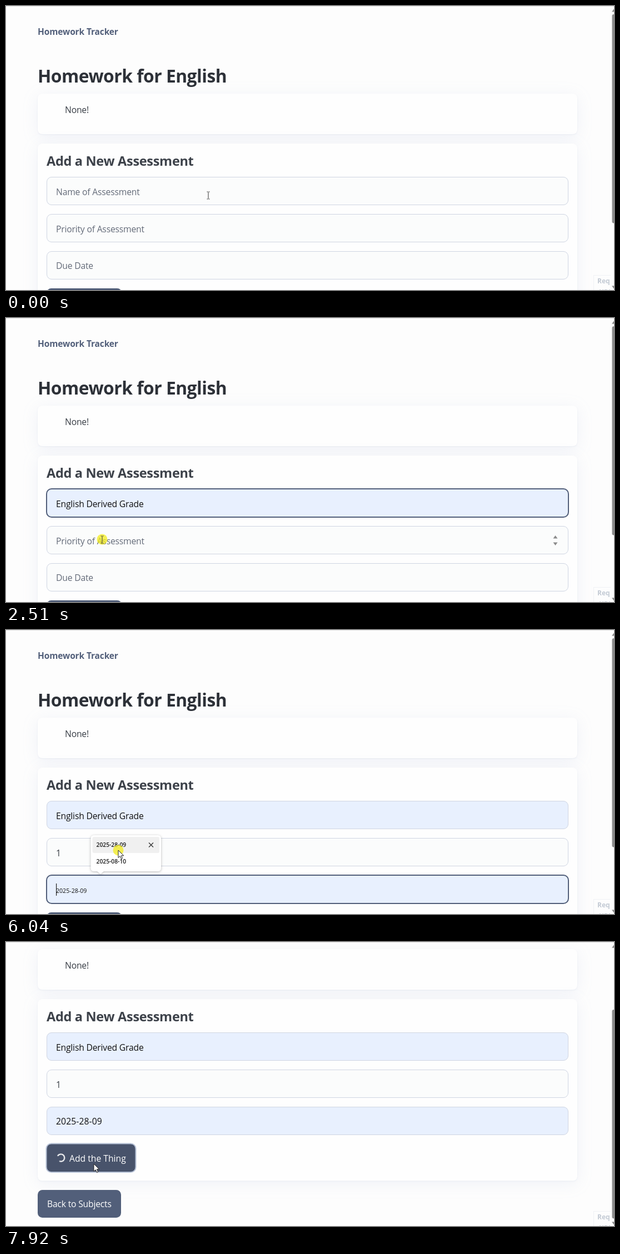
Write an HTML page that moves like this. It is 1094 px wide and 512 px high and loops after 7990 ms.

```html
<!DOCTYPE html>
<html lang="en">
<head>
<meta charset="utf-8">
<title>Homework Tracker</title>
<style>
html, body { margin: 0; width: 100%; height: 100%; overflow: hidden; background: #fdfdfd; }
svg { display: block; width: 1094px; height: 512px; }
text { font: 15.7px "Open Sans", "Noto Sans", sans-serif; letter-spacing: -.2px; fill: #373c44; }
.bold { font-weight: 700; }
.h1 { font-size: 31.8px; letter-spacing: -.5px; fill: #2d3138; }
.h2 { font-size: 23.5px; letter-spacing: -.3px; fill: #3d424a; }
.brand { font-size: 15.5px; letter-spacing: -.13px; fill: #525f7a; }
.hint { fill: #646b79; }
.value { fill: #111; }
.date { letter-spacing: .1px; }
.label { fill: #fff; letter-spacing: 0; }
.tight { letter-spacing: -.2px; }
.arial { font: 10.85px "Liberation Sans", Arial, sans-serif; letter-spacing: 0; }
.small { font-size: 10.6px; letter-spacing: 0; }
.option { font-size: 10.3px; font-weight: 600; fill: #1b1b1b; }
.day { letter-spacing: 0; }
.badge { font-size: 12px; letter-spacing: 0; fill: #c3cad4; }
.card { fill: #fefefe; filter: drop-shadow(0 1px 1px rgba(129,145,181,.1)) drop-shadow(0 5px 14px rgba(129,145,200,.11)); }
.field { fill: #fbfcfc; stroke: #cfd5e2; }
.ring { fill: none; stroke: #525f7a; stroke-width: 2; opacity: 0; }
.button { fill: #525f7a; }
.popup { fill: #fff; filter: drop-shadow(0 1px 2px rgba(0,0,0,.28)); }
.picked { fill: #f0f0f0; }
.close { fill: none; stroke: #333; stroke-width: 1.3; }
.bar { fill: #8b8b8b; }

/* One shared 7990 ms clock: percentage = ms / 79.9 */
.cut { animation: 7990ms step-end infinite; }
.run { animation: 7990ms linear infinite; }

#page { animation-name: scroll; }
@keyframes scroll {
  0% { transform: none; }
  83.35% { transform: translateY(-45px); }
  83.97% { transform: translateY(-101px); }
  84.85%, 100% { transform: translateY(-145px); }
}
#thumb { animation-name: thumb; }
@keyframes thumb {
  0% { transform: none; }
  83.35% { transform: translateY(33px); }
  83.97% { transform: translateY(74px); }
  84.85%, 100% { transform: translateY(107px); }
}

#field1 { animation-name: field1; }
@keyframes field1 {
  0%, 9.5% { fill: #fbfcfc; }
  11.6%, 20.9% { fill: #fff; }
  23.4%, 100% { fill: #e8f0fe; }
}
#ring1 { animation-name: ring1; }
@keyframes ring1 {
  0%, 9.5% { opacity: 0; }
  11.6%, 31.9% { opacity: 1; }
  34%, 100% { opacity: 0; }
}
#hint1 { animation-name: hint1; }
@keyframes hint1 { 0% { visibility: visible; } 20.14%, 100% { visibility: hidden; } }
#trial1, #hover1 { animation-name: hover1; }
@keyframes hover1 { 0% { visibility: hidden; } 20.14% { visibility: visible; } 27.9%, 100% { visibility: hidden; } }
#value1 { animation-name: value1; }
@keyframes value1 { 0% { visibility: hidden; } 27.9%, 100% { visibility: visible; } }
#popup1 { animation-name: popup1; }
@keyframes popup1 { 0% { visibility: hidden; } 8.25% { visibility: visible; } 27.9%, 100% { visibility: hidden; } }

#field2 { animation-name: field2; }
@keyframes field2 {
  0%, 31.9% { fill: #fbfcfc; }
  34%, 56% { fill: #fff; }
  58.6%, 100% { fill: #fbfcfc; }
}
#ring2 { animation-name: ring2; }
@keyframes ring2 {
  0%, 31.9% { opacity: 0; }
  34%, 56% { opacity: 1; }
  58.4%, 100% { opacity: 0; }
}
#hint2 { animation-name: hint2; }
@keyframes hint2 { 0% { visibility: visible; } 41.54%, 100% { visibility: hidden; } }
#value2 { animation-name: value2; }
@keyframes value2 { 0% { visibility: hidden; } 41.54%, 100% { visibility: visible; } }
#steps { animation-name: steps; }
@keyframes steps {
  0% { visibility: hidden; }
  30.4% { visibility: visible; }
  55.9% { visibility: hidden; }
  77.34% { visibility: visible; }
  88.2%, 100% { visibility: hidden; }
}

#field3 { animation-name: field3; }
@keyframes field3 {
  0%, 56.6% { fill: #fbfcfc; }
  58.8%, 63.8% { fill: #fff; }
  66.4%, 100% { fill: #e8f0fe; }
}
#ring3 { animation-name: ring3; }
@keyframes ring3 {
  0%, 56.6% { opacity: 0; }
  58.4%, 90.6% { opacity: 1; }
  93%, 100% { opacity: 0; }
}
#hint3 { animation-name: hint3; }
@keyframes hint3 { 0% { visibility: visible; } 63.8%, 100% { visibility: hidden; } }
#trial3, #hover3 { animation-name: hover3; }
@keyframes hover3 { 0% { visibility: hidden; } 63.8% { visibility: visible; } 77.34%, 100% { visibility: hidden; } }
#value3 { animation-name: value3; }
@keyframes value3 { 0% { visibility: hidden; } 77.34%, 100% { visibility: visible; } }
#popup3 { animation-name: popup3; }
@keyframes popup3 { 0% { visibility: hidden; } 57.56% { visibility: visible; } 77.34%, 100% { visibility: hidden; } }

#caret { animation-name: caret; }
@keyframes caret {
  0% { visibility: hidden; transform: none; }
  7.5% { visibility: visible; transform: none; }
  16.14% { visibility: hidden; transform: none; }
  32% { visibility: visible; transform: translateY(67px); }
  38.29% { visibility: hidden; transform: translateY(67px); }
  41.54% { visibility: visible; transform: translate(8px, 67px); }
  48.18% { visibility: hidden; transform: none; }
  55.9% { visibility: visible; transform: translateY(134px); }
  63.4% { visibility: hidden; transform: translateY(134px); }
  69.7% { visibility: visible; transform: translateY(134px); }
  76.4%, 100% { visibility: hidden; transform: none; }
}

#add { animation-name: add; }
@keyframes add {
  0%, 88.6% { fill: #525f7a; }
  91%, 100% { fill: #48536b; }
}
#idle { animation-name: idle; }
@keyframes idle { 0% { visibility: visible; } 90.6%, 100% { visibility: hidden; } }
#busy { animation-name: busy; }
@keyframes busy { 0% { visibility: hidden; } 90.6%, 100% { visibility: visible; } }
#glow { fill: none; stroke: #b6c1d6; stroke-width: 2; animation-name: glow; }
@keyframes glow { 0%, 90.6% { opacity: 0; } 93%, 100% { opacity: 1; } }
#spin { transform-origin: 98.7px 534px; animation-name: spin; }
@keyframes spin { 0%, 90.6% { transform: none; } 100% { transform: rotate(135deg); } }
#arc { fill: none; stroke: #fff; stroke-width: 3; stroke-linecap: round; animation-name: arc; }
@keyframes arc {
  0%, 90.6% { stroke-dasharray: 0 150; stroke-dashoffset: 0; }
  99.53% { stroke-dasharray: 42 150; stroke-dashoffset: -16; }
  100% { stroke-dasharray: 42 150; stroke-dashoffset: -18; }
}

#mouse { animation-name: mouse; animation-timing-function: ease-in-out; }
@keyframes mouse {
  0%, 2% { transform: translate(364px, 341px); }
  5.6%, 19% { transform: translate(219px, 342px); animation-timing-function: linear; }
  20.9% { transform: translate(224px, 374px); }
  22.5%, 27.9% { transform: translate(228px, 384px); }
  31%, 48% { transform: translate(173px, 399px); }
  54%, 61% { transform: translate(151px, 456px); }
  66% { transform: translate(196px, 403px); }
  69.7%, 76.4% { transform: translate(202px, 397px); }
  80.6%, 87.2% { transform: translate(271px, 408px); }
  89.6%, 100% { transform: translate(158px, 400px); }
}
#beam { animation-name: beam; }
@keyframes beam {
  0% { visibility: visible; }
  20.14% { visibility: hidden; }
  27.9% { visibility: visible; }
  63.4% { visibility: hidden; }
  77.34% { visibility: visible; }
  87.6%, 100% { visibility: hidden; }
}
#arrow { animation-name: arrow; }
@keyframes arrow {
  0% { visibility: hidden; }
  20.14% { visibility: visible; }
  27.9% { visibility: hidden; }
  63.4% { visibility: visible; }
  77.34% { visibility: hidden; }
  87.6%, 100% { visibility: visible; }
}
#click { animation-name: click; }
@keyframes click {
  0% { visibility: hidden; }
  6.3% { visibility: visible; }
  7.5% { visibility: hidden; }
  26.3% { visibility: visible; }
  27.9% { visibility: hidden; }
  31.2% { visibility: visible; }
  32.8% { visibility: hidden; }
  55% { visibility: visible; }
  56.6% { visibility: hidden; }
  75.58% { visibility: visible; }
  77.34% { visibility: hidden; }
  89.8% { visibility: visible; }
  91.4%, 100% { visibility: hidden; }
}
</style>
</head>
<body>
<svg viewBox="0 0 1094 512">
  <g id="page" class="cut">
    <text class="bold brand" x="57" y="52">Homework Tracker</text>
    <text class="bold h1" x="57" y="138">Homework for English</text>
    <rect class="card" x="57" y="158" width="971" height="73" rx="8"/>
    <text x="106" y="193">None!</text>

    <rect class="card" x="57" y="248" width="971" height="327.5" rx="8"/>
    <text class="bold h2" x="73" y="287.5">Add a New Assessment</text>

    <rect id="field1" class="field run" x="73.5" y="308.5" width="938" height="50" rx="8.5"/>
    <rect id="ring1" class="ring run" x="73" y="308" width="939" height="51" rx="9"/>
    <text id="hint1" class="hint cut" x="90" y="340.5">Name of Assessment</text>
    <text id="trial1" class="value arial cut" x="90" y="341">English Derived Grade</text>
    <text id="value1" class="value cut" x="90" y="340.5">English Derived Grade</text>

    <rect id="field2" class="field run" x="73.5" y="375.5" width="938" height="50" rx="8.5"/>
    <rect id="ring2" class="ring run" x="73" y="375" width="939" height="51" rx="9"/>
    <text id="hint2" class="hint cut" x="90" y="407.5">Priority of Assessment</text>
    <text id="value2" class="cut" x="90" y="407.5">1</text>
    <path id="steps" class="bar cut" d="M984.5 397.5l4-5.5 4 5.5zM984.5 404.5l4 5.5 4-5.5z"/>

    <rect id="field3" class="field run" x="73.5" y="442.5" width="938" height="50" rx="8.5"/>
    <rect id="ring3" class="ring run" x="73" y="442" width="939" height="51" rx="9"/>
    <text id="hint3" class="hint cut" x="90" y="474">Due Date</text>
    <text id="trial3" class="value small cut" x="90" y="474">2025-28-09</text>
    <text id="value3" class="value date cut" x="90" y="474">2025-28-09</text>

    <rect id="caret" class="cut" x="90" y="323" width="1.2" height="22" fill="#222"/>

    <g id="idle" class="cut">
      <rect class="button" x="73" y="509" width="135.5" height="50.5" rx="8.5"/>
      <text class="label" x="90" y="540.5">Add the Thing</text>
    </g>
    <g id="busy" class="cut">
      <rect id="add" class="run" x="73" y="509" width="160" height="50.5" rx="8.5"/>
      <rect id="glow" class="run" x="72.5" y="508.5" width="161" height="51.5" rx="9"/>
      <g id="spin" class="run">
        <g transform="translate(98.7 534) scale(.69)"><circle id="arc" class="run" r="9.5"/></g>
      </g>
      <text class="label" x="114" y="540.5">Add the Thing</text>
    </g>

    <rect class="button" x="57" y="592" width="150" height="50" rx="8.5"/>
    <text class="label tight" x="74" y="623">Back to Subjects</text>
  </g>

  <g id="popup1" class="cut">
    <path class="popup" d="M158 367h6l6-5 6 5h119q6 0 6 6v81q0 6-6 6H158.5q-6 0-6-6v-81q0-6 6-6z"/>
    <g id="hover1" class="cut">
      <rect class="picked" x="155.5" y="370" width="142.5" height="29" rx="3"/>
      <path class="close" d="M279 380.5l8 8m0-8l-8 8"/>
    </g>
    <text class="option" x="162.5" y="388.3">English Derived Grade</text>
    <text class="option" x="162.5" y="417.3">DTD Website</text>
    <text class="option" x="162.5" y="446.3">English Assessment</text>
  </g>

  <g id="popup3" class="cut">
    <path class="popup" d="M158.5 370h114.5q6 0 6 6v53q0 6-6 6H176l-6 5-6-5h-5.5q-6 0-6-6v-53q0-6 6-6z"/>
    <g id="hover3" class="cut">
      <rect class="picked" x="155.5" y="373" width="120.5" height="29" rx="3"/>
      <path class="close" d="M257 383.5l8 8m0-8l-8 8"/>
    </g>
    <text class="option day" x="162.5" y="391.3">2025-28-09</text>
    <text class="option day" x="162.5" y="420.7">2025-08-10</text>
  </g>

  <rect width="1094" height="1" fill="#e4e4e4"/>
  <rect x="1057.5" y="485.5" width="40" height="40" fill="#fdfdfd" stroke="#f0f2f5"/>
  <text class="bold badge" x="1064" y="500">Req</text>
  <text class="bold badge" x="1067" y="519.5">URL</text>
  <rect x="1088" y="1" width="6" height="511" fill="#fcfcfc"/>
  <rect id="thumb" class="bar cut" x="1090.5" y="15" width="8" height="376.5" rx="3"/>
  <path class="bar" d="M1090 10.5l4.5-6v6zM1090 504.5l4.5 6v-6z"/>

  <g id="mouse" class="run">
    <circle id="click" class="cut" r="9.5" fill="#f3ec1c" opacity=".75"/>
    <path id="beam" class="cut" d="M-2.5-6h2m1 0h2M0-5.5v12M-2.5 7h2m1 0h2" fill="none" stroke="#333"/>
    <path id="arrow" class="cut" d="M0 0v13.5l3.2-2.9 2.2 4.9 2.2-1-2.2-4.7h4.4z" fill="#fff" stroke="#222" stroke-linejoin="round"/>
  </g>
</svg>
</body>
</html>
```
